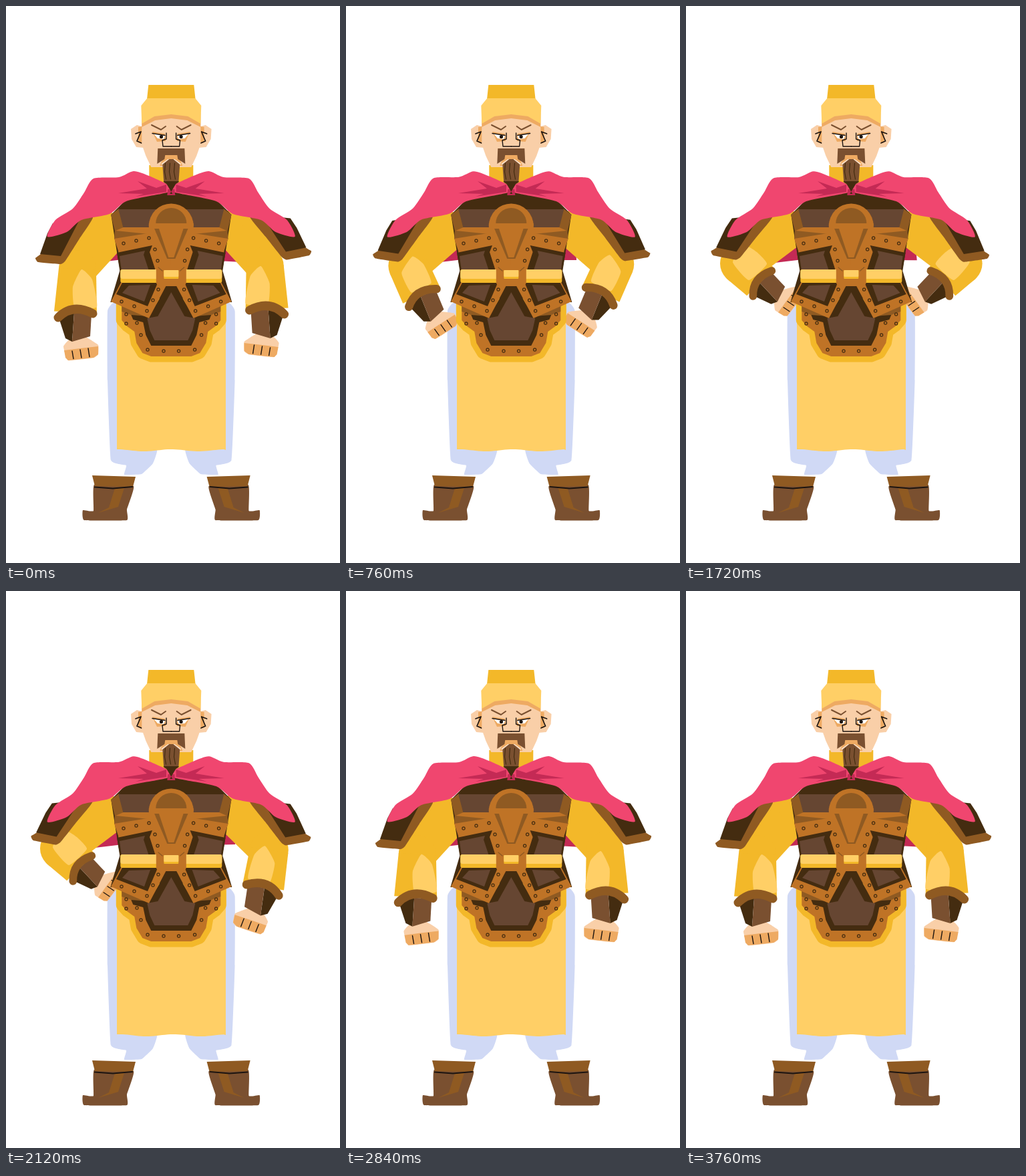
An HTML page with a canvas that plays this animation: 500 px wide and 833 px high, repeating every 3.8 s.

```html
<!DOCTYPE html>
<html lang="en">
<head>
<meta charset="utf-8">
<title>Armoured warrior</title>
<style>
html, body { margin: 0; width: 100%; height: 100%; overflow: hidden; background: #fff; }
canvas { display: block; width: 500px; height: 833px; }
</style>
</head>
<body>
<canvas id="stage" width="500" height="833"></canvas>
<script>
const ctx = document.getElementById('stage').getContext('2d');
const LOOP = 3800, STEP = 40, SWAY = 950, MID = 247.3;
const C = {
  gold: '#f3b829', yellow: '#ffcf66', skin: '#f9cfa8', tan: '#eeaa62',
  pink: '#f0466f', wine: '#c42a55', orange: '#bf7326', bronze: '#8f5a22',
  leather: '#7a5030', plate: '#664632', dark: '#442c10', blue: '#d0d9f5', ink: '#1c1410'
};

const mix = (a, b, k) => a + (b - a) * k;
const mixAll = (a, b, k) => a.map((v, i) => mix(v, b[i], k));
const ease = x => {
  const k = Math.max(0, Math.min(1, x));
  return k < .5 ? 4 * k ** 3 : 1 - 4 * (1 - k) ** 3;
};

function fill(color) {
  ctx.fillStyle = color;
  ctx.fill();
}

function stroke(color, width) {
  ctx.strokeStyle = color;
  ctx.lineWidth = width;
  ctx.stroke();
}

function trace(p) {
  ctx.beginPath();
  for (let i = 0; i < p.length; i += 2) ctx.lineTo(p[i], p[i + 1]);
}

function poly(color, p) {
  trace(p);
  ctx.closePath();
  fill(color);
}

function line(p, width = 1.4, color = C.ink) {
  trace(p);
  stroke(color, width);
}

// Closed curve through every point.
function blob(color, p, round = .1) {
  const at = i => p[(i + p.length) % p.length];
  ctx.beginPath();
  ctx.moveTo(p[0], p[1]);
  for (let i = 0; i < p.length; i += 2) {
    const x1 = at(i), y1 = at(i + 1), x2 = at(i + 2), y2 = at(i + 3);
    ctx.bezierCurveTo(
      x1 + (x2 - at(i - 2)) * round, y1 + (y2 - at(i - 1)) * round,
      x2 - (at(i + 4) - x1) * round, y2 - (at(i + 5) - y1) * round, x2, y2);
  }
  fill(color);
}

// Symmetric shape from pairs of height and half width.
function slab(color, ...profile) {
  const side = s => profile.map(([y, w]) => [MID + s * w, y]);
  poly(color, [...side(1), ...side(-1).reverse()].flat());
}

function disc(color, x, y, r, from = 0, to = Math.PI * 2) {
  ctx.beginPath();
  ctx.arc(x, y, r, from, to);
  fill(color);
}

function box(color, y, w, h, r) {
  ctx.beginPath();
  ctx.roundRect(MID - w / 2, y, w, h, r);
  fill(color);
}

function rivets(x1, y1, x2, y2, count) {
  for (let i = 0; i < count; i++) {
    const k = i / (count - 1), x = mix(x1, x2, k), y = mix(y1, y2, k);
    disc(C.dark, x, y, 2.7);
    disc(C.orange, x, y, 1.5);
  }
}

function flipped(draw) {
  ctx.save();
  ctx.translate(2 * MID, 0);
  ctx.scale(-1, 1);
  draw();
  ctx.restore();
}

function both(draw) {
  draw();
  flipped(draw);
}

function backCape(s) {
  poly(C.wine, [150, 320, 340, 320, mix(352, 332, s), mix(383, 374, s), 300, 380, 175, 379, 133, 384]);
}

function leg() {
  blob(C.blue, [165, 445, 152, 456, 152, 560, 157, 679, 180, 687, 177, 701, 203, 700,
    220, 684, 226, 660, 172, 600], .05);
  blob(C.leather, [132, 716, 191, 718, 181, 753, 181, 769, 117, 769, 115, 754, 131, 755], .05);
  poly(C.bronze, [163, 721, 177, 721, 168, 749, 138, 758, 154, 750]);
  poly(C.bronze, [129, 702, 194, 704, 190, 719, 133, 718]);
  line([133, 719.5, 160, 721.5, 189, 719], 2.2);
}

function apron(s) {
  const hem = [];
  for (let x = 166; x <= 329; x += 4) {
    const phase = (x - MID) / 13;
    hem.push(x, 664.5 - 1.5 * Math.cos(phase) - s * Math.sin(phase));
  }
  poly(C.yellow, [...hem, 329, 664, 329, 447, 166, 447]);
}

// Tapered segment between two joints, rounded at the first.
function limb(color, x1, y1, r1, x2, y2, r2) {
  const a = Math.atan2(y2 - y1, x2 - x1) + Math.PI / 2, c = Math.cos(a), s = Math.sin(a);
  disc(color, x1, y1, r1);
  poly(color, [x1 + c * r1, y1 + s * r1, x2 + c * r2, y2 + s * r2,
    x2 - c * r2, y2 - s * r2, x1 - c * r1, y1 - s * r1]);
}

function hand() {
  blob(C.skin, [-18, 51, -7, 39, 15, 37, 34, 49, 34, 63, 27, 68, -11, 72], .06);
  poly(C.tan, [-17, 57, 7, 54, 34, 51, 34, 63, 27, 68, -11, 72, -15, 68]);
  for (let x = -5; x < 20; x += 12) line([x, 57 - x / 6, x + 2, 69 - x / 8]);
}

// Local origin is the middle of the cuff, the hand hangs downwards.
function bracer() {
  poly(C.dark, [-25, 8, -2, 1, -5, 44, -15, 39]);
  poly(C.leather, [-2, 1, 24, 3, 22, 36, -5, 44]);
  ctx.beginPath();
  ctx.moveTo(-26, 8);
  ctx.quadraticCurveTo(-4, -14, 26, 2);
  stroke(C.bronze, 13);
}

function arm(k, lift, padDown, padUp) {
  const elbow = mixAll([107, 393, 28], [82, 385, 31], k);
  const cuff = mixAll([104, 458], [111, 412], k);
  cuff[0] += 5 * Math.sin(Math.PI * k);

  ctx.save();
  ctx.translate(0, -lift * (1 - k));
  limb(C.gold, 150, mix(340, 335, k), mix(32, 30, k), ...elbow);
  limb(C.gold, ...elbow, ...cuff, mix(32, 29, k));
  blob(C.yellow, mixAll(
    [113, 394, 129, 409, 136, 450, 103, 452, 100, 420],
    [89, 359, 106, 368, 121, 386, 94, 410, 70, 383], k), .08);
  ctx.translate(...cuff);
  ctx.rotate(-.82 * k);
  ctx.scale(1 - .1 * k, 1 - .1 * k);
  hand();
  bracer();
  ctx.restore();

  ctx.save();
  ctx.translate(140, 310);
  ctx.rotate(mix(padDown, padUp, k) * Math.PI / 180);
  blob(C.bronze, [-65, 15, -10, 6, -30, 38, -51, 71, -58, 76, -92, 73, -96, 67, -85, 58], .05);
  poly(C.dark, [-78, 30, -70, 15, -28, 6, -58, 64, -89, 61]);
  ctx.restore();
}

function lowerGuard() {
  const outline = [[446, 74], [470, 74], [479, 66], [487, 55], [504, 52], [519, 43], [524, 30]];
  slab(C.orange, ...outline);
  stroke(C.gold, 17);
  slab(C.orange, ...outline);
  slab(C.bronze, [446, 74], [457, 74], [463, 57], [463, 34]);
  slab(C.dark, [420, 7], [464, 33], [462, 60], [469, 57], [473, 42], [492, 38], [508, 30]);
  slab(C.plate, [428, 0], [464, 20], [467, 36], [485, 32], [500, 25]);
  both(() => {
    rivets(180, 461, 180, 475, 2);
    rivets(196, 474, 202, 492, 2);
    rivets(212, 514, 236, 516, 2);
  });
}

function hipPlate() {
  poly(C.orange, [173, 412, 157, 442, 214, 467, 242, 414]);
  poly(C.dark, [175, 412, 165, 431, 212, 449, 228, 412]);
  poly(C.plate, [184, 418, 174, 429, 207, 442, 216, 417]);
  rivets(173, 442, 211, 456, 3);
  rivets(220, 440, 228, 424, 2);
}

function breastPlate() {
  poly(C.bronze, [157, 312, 169, 303, 176, 331, 163, 337]);
  poly(C.bronze, [163, 335, 248, 329, 248, 345, 162, 349]);
  poly(C.orange, [162, 348, 224, 338, 248, 376, 248, 396, 171, 396, 168, 366]);
  poly(C.dark, [166, 369, 219, 358, 215, 368, 224, 396, 171, 396]);
  poly(C.plate, [170, 374, 208, 366, 206, 372, 214, 396, 173, 396]);
  rivets(176, 355, 214, 347, 3);
  rivets(223, 364, 227, 381, 2);
}

function cuirass() {
  slab(C.dark, [262, 60], [290, 68], [312, 90], [396, 77], [443, 91]);
  lowerGuard();
  both(hipPlate);
  both(breastPlate);
  slab(C.plate, [304, 79], [331, 72]);
  slab(C.orange, [331, 72], [336, 83], [342, 24], [331, 20]);
  slab(C.bronze, [331, 26], [378, 6]);
  slab(C.orange, [331, 19], [376, 4]);
  disc(C.orange, MID, 329, 33.5, Math.PI, 0);
  slab(C.orange, [325, 33.5], [333, 33.5]);
  disc(C.bronze, MID, 325, 23, Math.PI, 0);
}

function belt() {
  box(C.gold, 394, 152, 20, 3);
  box(C.yellow, 394, 152, 14, 3);
  box(C.orange, 387, 45, 32, 6);
  both(() => line([228, 391, 234, 396], 1.4, C.bronze));
  box(C.gold, 395, 22, 13, 1);
  box(C.yellow, 395, 22, 10, 1);
}

function halfCape(s) {
  const edge = [248, 270, 214, 254, 191, 247, 169, 256, 131, 258, 117, 279, 100, 303, 74, 320,
    62, 345, 91, 338, 113, 320, 155, 311, 180, 292, 232, 281, 248, 277];
  blob(C.pink, edge.map((v, i) => i % 2 ? v + s * 1.6 * Math.sin(edge[i - 1] / 28) : v), .12);
  poly(C.wine, [240, 267, 225, 272, 197, 262, 211, 273, 168, 280, 206, 281, 194, 285, 240, 278]);
}

function ear() {
  poly(C.skin, [187, 184, 196, 178, 206, 181, 206, 212, 195, 211, 188, 199]);
  poly(C.tan, [198, 181, 204, 180, 204, 206, 198, 204]);
  line([194, 191, 202, 188, 196, 202, 203, 205], 1.7);
}

function halfFace() {
  poly(C.tan, [219, 188, 238, 191, 239, 202, 226, 203]);
  poly('#fff', [221, 191, 238, 194, 236, 199, 227, 198]);
  disc(C.ink, 232.5, 195.5, 2.6);
  line([219, 190.5, 238, 193.5]);
  line([218, 178, 232, 185, 239, 180], 2, C.leather);
  line([240, 190, 240, 199, 234, 201, 235, 210, MID, 210]);
}

function head() {
  both(ear);
  slab(C.skin, [165, 44], [207, 44], [224, 38], [241, 30]);
  slab(C.tan, [160, 44], [181, 44], [171, 24], [168, 0]);
  both(halfFace);
  slab(C.tan, [222, 10], [239, 17]);
  slab('#fbe3cd', [229, 5], [236, 15], [240, 11]);
  slab(C.leather, [213, 20], [236, 21], [229, 10], [223, 9]);
  slab(C.leather, [229, 3], [237, 13], [264, 11], [270, 0]);
  slab(C.dark, [262, 12], [266, 7], [281, -2]);
  for (let i = -1; i < 2; i++) {
    const x = 245.5 + i * 7;
    line([x, 235, x - 1, 248, x + 1, 259], 1.2, C.dark);
  }
  slab(C.gold, [118, 34], [146, 37]);
  slab(C.yellow, [138, 36], [149, 45], [176, 44], [165, 25], [162, 0]);
}

function draw(t) {
  const sway = (1 - Math.cos(t / SWAY * Math.PI * 2)) / 2;
  const raise = ease((t - 500) / 500);
  const left = raise - ease((t - 2400) / 500);
  const right = raise - ease((t - 1820) / 500);

  ctx.fillStyle = '#fff';
  ctx.fillRect(0, 0, 500, 833);
  ctx.lineCap = ctx.lineJoin = 'round';

  backCape(sway);
  both(leg);
  apron(sway);
  arm(left, 0, 0, 6);
  flipped(() => arm(right, 5, 6, 3));
  cuirass();
  belt();
  slab(C.gold, [238, 33], [272, 33]);
  both(() => halfCape(sway));
  slab(C.wine, [274, 5], [283, 6]);
  head();
}

function tick(now) {
  draw(Math.floor(now % LOOP / STEP) * STEP);
  requestAnimationFrame(tick);
}

draw(0);
requestAnimationFrame(tick);
</script>
</body>
</html>
```
